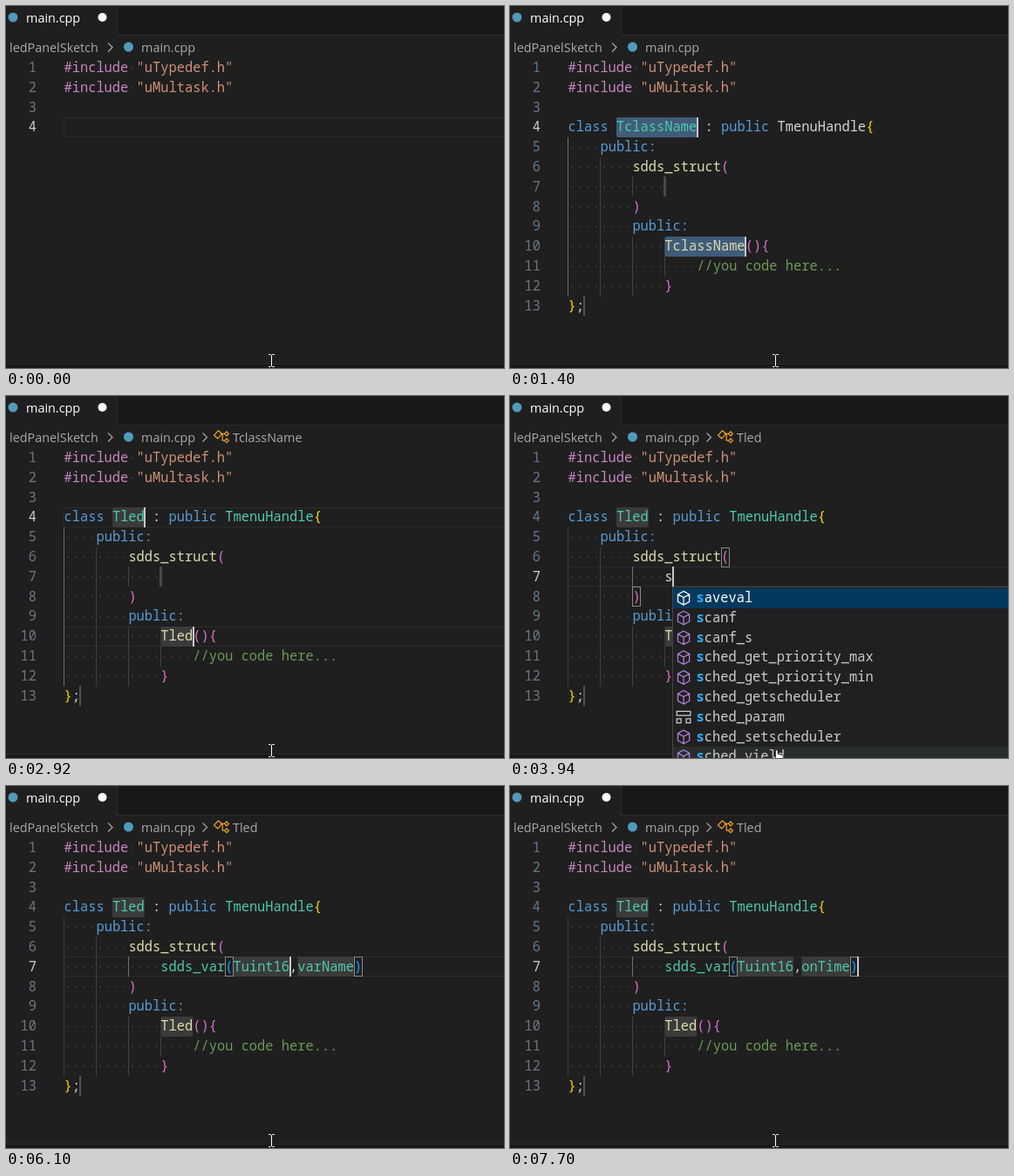
Recreate the animation shown at these times as an HTML page with a canvas. Size 571 by 416 pixels, loop 8000 ms.

```html
<!DOCTYPE html>
<html lang="en">
<head>
<meta charset="utf-8">
<title>Code completion</title>
<style>
  html, body { margin: 0; width: 100%; height: 100%; overflow: hidden; background: #1f1f1f; }
  canvas { display: block; }
</style>
</head>
<body>
<canvas id="stage" width="571" height="416"></canvas>
<script>
const ctx = document.getElementById('stage').getContext('2d');
const LOOP = 8000, LEFT = 66.5, TOP = 59.6, ROW = 22.8, CHAR = 9.236;
const MONO = '15.39px "Noto Sans Mono", "DejaVu Sans Mono", monospace';
const UI = '14.4px "Open Sans", "Noto Sans", sans-serif';
const C = {
  text: '#d4d4d4', blue: '#569cd6', type: '#4ec9b0', func: '#dcdcaa', pink: '#c586c0',
  string: '#ce9178', note: '#6a9955', gold: '#ffd700', purple: '#da70d6', azure: '#179fff',
  dot: '#3f3f3f', grey: '#3b3b3b', picked: '#405c79', caret: '#c8c8c8', orange: '#ee9d28'
};

// Symbol icons on a 16 unit grid
const ICONS = {
  space: ['#ccc', 'M6 2q-2 0-2 2v2q0 2-2 2q2 0 2 2v2q0 2 2 2M10 2q2 0 2 2v2q0 2 2 2q-2 0-2 2v2q0 2-2 2'],
  constant: ['#ccc', 'M2.5 3.5h11q1 0 1 1v7q0 1-1 1h-11q-1 0-1-1v-7q0-1 1-1M4 6.5h8M4 9.5h8'],
  snippet: ['#ccc', 'M2.5 13V2h11V13M2 14.5h1.2M5 14.5h1.2M7.5 14.5h1.2M10 14.5h1.2M12.8 14.5h1.2'],
  cube: ['#b180d7', 'M8 1.5l5.5 3v7L8 14.5l-5.5-3v-7zM2.5 4.5L8 7.5l5.5-3M8 7.5v7'],
  field: ['#75beff', 'M1.5 6.5L9 3l5.5 2.5v5L7 14l-5.5-3zM1.5 6.5L7 9l7.5-3.5M7 9v5'],
  struct: ['#ccc', 'M1.5 2.5h13v4h-13zM1.5 9.5h4v4h-4zM10.5 9.5h4v4h-4z'],
  choice: [C.orange, 'M7.5 6V2.5h7v6H10M1.5 7.5h7v6h-7zM9 4.5h4M9 6.5h4M3 9.5h4M3 11.5h4'],
  iface: ['#75beff', 'M4.8 8a1.7 1.7 0 1 1-3.4 0a1.7 1.7 0 1 1 3.4 0H10M14.6 8a2.3 2.3 0 1 1-4.6 0a2.3 2.3 0 1 1 4.6 0'],
  operator: ['#ccc', 'M1.5 6.5l4-5M1.5 2h1.5M4.5 6h1.5M9 4h5M2 10l4 4M6 10l-4 4M9 12h5M11.5 9.5v5'],
  tree: [C.orange, 'M1 6.5L5 2l3.5 3L4.5 9.5zM7 5h4M9 5v6.5h2M11 5l2-2 2 2-2 2zM11 11.5l2-2 2 2-2 2z']
};

const items = (icon, names) => names.split(' ').map(name => ({ icon, name }));
const macros = items('constant', 'sdds_enum sdds_enumClass sdds_joinOpt sdds_ref sdds_self sdds_struct sdds_var');
const unique = items('constant', 'SDDS_UNIQUE_NAME');
const sLists = [
  ...items('cube', 'saveval scanf scanf_s sched_get_priority_max sched_get_priority_min sched_getscheduler'),
  ...items('struct', 'sched_param'), ...items('cube', 'sched_setscheduler sched_yield'),
  ...items('space', 'sdds'), ...macros.slice(0, 2)
];
const sdList = [...items('space', 'sdds'), ...macros, ...items('snippet', 'sdStruct sdVar'), ...unique,
  ...items('constant', 'SIG_DFL')];
const sdsList = [...items('snippet', 'sdStruct'), ...items('space', 'sdds'), ...macros, ...unique,
  ...items('cube', 'std_status std_stream')];
const sdvList = [...items('snippet', 'sdVar'), ...items('constant', 'sdds_var')];
const typeList = items('choice', 'Tuint8 Tuint16 Tuint32 Tint8 Tint16 Tint32 Tfloat32 Ttime Tstring');
const exitTypes = [...items('iface', '_onexit_t'), ...items('struct', '_onexit_table_t'),
  ...items('constant', '_ONEXIT_T_DEFINED')];
const onList = [
  ...items('field', 'on'), ...items('cube', 'onexit'), ...items('constant', 'onexit_t'),
  ...items('cube', '_onexit'), ...exitTypes,
  { icon: 'operator', name: 'operator new[]' }, { icon: 'operator', name: 'operator new' }
];
const onTList = [...items('constant', 'onexit_t'), ...exitTypes, ...items('constant', 'CONN_TIME_MAX CONT_TIMEOUT')];
const timeList = items('constant', 'onTimeEvent CONN_TIME_MAX CONT_TIMEOUT connectTimer monoTimeEnd _ON_TIME_LIMIT');

// Each step changes some fields of the editor state and keeps the rest
const popup = (list, query, col, selected = 0) => ({ list, query, col, selected });
const rename = name => ({ cls: name, picked: '', carets: [[4, 6 + name.length], [10, 12 + name.length]] });
const argument = (name, list) => ({
  body: `sdds_var(Tuint16,${name})`, picked: '', carets: [[7, 29 + name.length]],
  pop: list && popup(list, name, 29 + name.length)
});
const script = [
  [0, { word: '', cls: '', body: '', line: 4, carets: [], picked: '', crumb: '', pop: null, colored: false }],
  [120, { word: 's', carets: [[4, 1]] }],
  [370, { pop: popup(sLists, 's', 1) }],
  [650, { word: 'sd', carets: [[4, 2]], pop: popup(sdList, 'sd', 2) }],
  [900, { word: 'sds', carets: [[4, 3]], pop: popup(sdsList, 'sds', 3) }],
  [1400, { ...rename('TclassName'), picked: 'cls', pop: null }],
  [1550, { colored: true }],
  [2100, { carets: [], crumb: 'TclassName' }],
  [2380, rename('T')],
  [2510, rename('Tl')],
  [2650, rename('Tle')],
  [2790, rename('Tled')],
  [3200, { line: 7, carets: [[7, 12]] }],
  [3480, { crumb: 'Tled' }],
  [3630, { body: 's', carets: [[7, 13]] }],
  [3940, { pop: popup(sLists, 's', 13) }],
  [4090, { body: 'sd', carets: [[7, 14]], pop: popup(sdList, 'sd', 13) }],
  [4360, { pop: popup(sdList, 'sd', 14) }],
  [4610, { body: 'sdv', carets: [[7, 15]], pop: popup(sdvList, 'sdv', 15) }],
  [5170, { body: 'sdds_var(Tuint8,varName)', picked: 'first', carets: [[7, 27]], pop: popup(typeList, 'Tuint8', 27) }],
  [5570, { carets: [] }],
  [5850, { carets: [[7, 27]], pop: popup(typeList, 'Tuint8', 27, 1) }],
  [6040, { ...argument('varName'), carets: [[7, 28]] }],
  [6230, { picked: 'second', carets: [[7, 36]] }],
  [6630, argument('o')],
  [6760, argument('o', onList)],
  [6900, argument('on', onList)],
  [7150, argument('onT', onTList)],
  [7290, argument('onTi', timeList)],
  [7440, argument('onTim', timeList)],
  [7580, argument('onTime', timeList)],
  [7700, { carets: [[7, 36]], pop: null }]
];
let last = {};
const states = script.map(([time, change]) => last = { ...last, ...change, time });

const colX = col => LEFT + col * CHAR;
const rowY = row => TOP + (row - 1) * ROW;

function rect(x, y, w, h, color) {
  ctx.fillStyle = color;
  ctx.fillRect(Math.round(x), Math.round(y), Math.round(w), Math.round(h));
}
function frame(x, y, w, h, color) {
  ctx.strokeStyle = color;
  ctx.lineWidth = 1;
  ctx.strokeRect(Math.round(x) + .5, Math.round(y) + .5, Math.round(w) - 1, Math.round(h) - 1);
}
function text(string, x, y, color, font = MONO) {
  ctx.font = font;
  ctx.fillStyle = color;
  ctx.fillText(string, x, Math.round(y));
}
function disc(x, y, r, color) {
  ctx.fillStyle = color;
  ctx.beginPath();
  ctx.arc(x, y, r, 0, 7);
  ctx.fill();
}
function line(path, color, width = 1) {
  ctx.strokeStyle = color;
  ctx.lineWidth = width;
  ctx.stroke(new Path2D(path));
}
function icon(name, x, y, color) {
  const [base, path] = ICONS[name];
  ctx.save();
  ctx.translate(x - 9.6, y - 9.6);
  ctx.scale(1.2, 1.2);
  line(path, color || base, 1.05);
  ctx.restore();
}
function mark(row, col, length, color) {
  ctx.fillStyle = color;
  ctx.beginPath();
  ctx.roundRect(colX(col), Math.round(rowY(row)), length * CHAR, 23, 2);
  ctx.fill();
}

// Parts alternate between text and colour
function code(row, indent, ...parts) {
  for (let i = 0; i < indent; i++) dot(row, i);
  let col = indent;
  for (let i = 0; i < parts.length; i += 2) {
    text(parts[i], colX(col), rowY(row) + 16.4, parts[i + 1]);
    col += parts[i].length;
  }
}
function dot(row, col) {
  disc(colX(col + .5), rowY(row) + 11.6, 1, C.dot);
}

function header(crumb) {
  rect(127, 0, 444, 34, '#181818');
  rect(127, 0, 1, 34, '#2b2b2b');
  rect(127, 33, 444, 1, '#2b2b2b');
  disc(8, 13, 5.5, '#519aba');
  text('main.cpp', 23, 19, '#fff', UI);
  disc(110.5, 13, 5, '#fff');
  text('ledPanelSketch', 4, 53, '#a9a9a9', UI);
  line('M117 42.5l5 5-5 5', '#a9a9a9', 1.2);
  disc(140.5, 47, 5.5, '#519aba');
  text('main.cpp', 155, 53, '#a9a9a9', UI);
  if (!crumb) return;
  line('M225.5 42.5l5 5-5 5', '#a9a9a9', 1.2);
  icon('tree', 247, 47);
  text(crumb, 260, 53, '#a9a9a9', UI);
}

function guides(active) {
  const spans = [[0, 5, 12], [4, 6, 12], [8, 7, 7], [8, 10, 12], [12, 11, 11]];
  for (const [col, from, to] of spans) {
    const lit = active === 4 ? col === 0 : col === 8 && from === 7;
    rect(colX(col) - .6, rowY(from), 1, (to - from + 1) * ROW, lit ? '#707070' : '#404040');
  }
}

function classBody(s) {
  const { cls, body } = s;
  const nameMark = s.picked === 'cls' ? C.picked : C.grey;
  const call = body.match(/^(\w+)\((\w+),(\w+)\)$/);
  guides(s.line);
  mark(4, 6, cls.length, nameMark);
  mark(10, 12, cls.length, nameMark);
  rect(colX(2) - 1, rowY(13), 2, 23, '#525252');
  const type = s.colored ? C.type : C.text;
  code(4, 0, 'class ', C.blue, cls, C.type, ' : ', C.text, 'public', C.blue, ' TmenuHandle', type, '{', C.gold);
  code(5, 4, 'public:', C.blue);
  code(6, 8, 'sdds_struct', C.func, '(', C.purple);
  if (call) {
    const [, macro, first, second] = call;
    mark(7, 21, first.length, s.picked === 'first' ? C.picked : C.grey);
    mark(7, 22 + first.length, second.length, s.picked === 'second' ? C.picked : C.grey);
    code(7, 12, macro, C.type, '(', C.azure, first, C.type, ',', C.text, second, C.type, ')', C.azure);
  } else {
    if (!body) rect(colX(12) - 1, rowY(7), 3, 23, '#484848');
    code(7, 12, body, C.text);
  }
  code(8, 8, ')', C.purple);
  code(9, 8, 'public:', C.blue);
  code(10, 12, cls, C.func, '(){', C.purple);
  code(11, 16, '//you code here...', C.note);
  code(12, 12, '}', C.purple);
  code(13, 0, '}', C.gold, ';', C.text);
  if (s.line === 7 && !s.picked) {
    const pair = call ? [[7, 20], [7, 11 + body.length]] : [[6, 19], [8, 8]];
    for (const [row, col] of pair) frame(colX(col), rowY(row), CHAR + 1, 23, '#888');
  }
}

// Positions of the query letters: a whole run, then scattered, then its longest ending
function matches(name, query) {
  const low = name.toLowerCase(), want = query.toLowerCase();
  const run = (at, length) => Array.from({ length }, (_, i) => at + i);
  if (low.includes(want)) return run(low.indexOf(want), want.length);
  const found = [];
  for (let i = 0; i < low.length; i++) if (low[i] === want[found.length]) found.push(i);
  if (found.length === want.length) return found;
  for (let cut = 1; cut < want.length - 1; cut++) {
    const at = low.indexOf(want.slice(cut));
    if (at >= 0) return run(at, want.length - cut);
  }
  return [];
}

function suggestions({ list, query, col, selected }, row) {
  const x = colX(col) - .5, y = rowY(row + 1), width = 516;
  const height = list.length * ROW + 3;
  const hovering = x < 304 && y + height > 407;
  rect(x, y, width, height, '#202020');
  list.forEach(({ icon: symbol, name }, i) => {
    const top = y + 1.4 + i * ROW, on = i === selected;
    if (on) rect(x, top, width, ROW, '#04395e');
    else if (hovering && top <= 407 && top + ROW > 407) rect(x, top, width, ROW, '#2a2d2e');
    icon(symbol, x + 13, top + 11.6, on && '#fff');
    const hits = matches(name, query);
    [...name].forEach((letter, k) => {
      const hit = hits.includes(k);
      text(letter, x + 27.4 + k * CHAR, top + 16.4, hit ? '#2aaaff' : on ? '#fff' : '#ccc', (hit ? 'bold ' : '') + MONO);
    });
  });
  frame(x, y, width, height, '#454545');
  return hovering;
}

function pointer(hand) {
  if (hand) {
    const shape = new Path2D('M304.5 416v-8.5q1.5-1.5 2.5 0v4l6 1.2v7h-8l-3.5-5q1-1.5 3 .3');
    ctx.fillStyle = '#fff';
    ctx.fill(shape);
    ctx.strokeStyle = '#000';
    ctx.lineWidth = .6;
    ctx.stroke(shape);
  } else {
    line('M301 400.5h2.5l1 1 1-1h2.5M304.5 401v13M301 414.5h2.5l1-1 1 1h2.5', '#fff');
  }
}

function draw(s) {
  rect(0, 0, 571, 416, '#1f1f1f');
  header(s.crumb);
  if (!s.picked) {
    const lit = s.cls && s.line === 4 ? [4, 10] : [s.line];
    for (const row of lit) frame(66, rowY(row), 520, 23, '#2c2c2c');
  }
  for (let n = 1; n <= (s.cls ? 13 : 4); n++) {
    text(String(n), 35 - String(n).length * CHAR, rowY(n) + 16.4, n === s.line ? '#ccc' : '#6e7681');
  }
  ['"uTypedef.h"', '"uMultask.h"'].forEach((file, i) => {
    code(i + 1, 0, '#include ', C.pink, file, C.string);
    dot(i + 1, 8);
  });
  if (s.cls) classBody(s);
  else code(4, 0, s.word, C.text);
  for (const [row, col] of s.carets) rect(colX(col) - .5, rowY(row), 2, 23, C.caret);
  rect(0, 411, 571, 5, '#181818');
  rect(0, 411, 571, 1, '#2b2b2b');
  pointer(s.pop ? suggestions(s.pop, s.line) : false);
}

const start = performance.now();
function tick() {
  const time = (performance.now() - start) % LOOP;
  draw(states.findLast(s => s.time <= time));
  requestAnimationFrame(tick);
}
tick();
</script>
</body>
</html>
```
